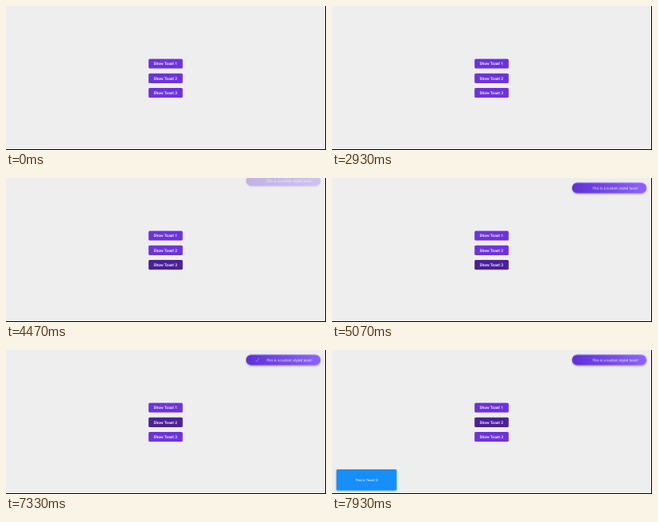
These frames come from a looping animation (400 by 181 pixels, 8 s). An HTML page:

```html
<!DOCTYPE html>
<html lang="en">
<head>
<meta charset="utf-8">
<title>Toast demo</title>
<style>
  html, body { margin: 0; width: 100%; height: 100%; overflow: hidden; background: #eee; }
  svg { display: block; width: 400px; height: 181px; }
  text {
    font-family: Roboto, "Open Sans", sans-serif;
    fill: #fff;
    text-rendering: geometricPrecision;
  }
  .button rect { fill: #6c33dc; }
  .button text { font-size: 4.95px; font-weight: 500; text-anchor: middle; }
  .toast { font-size: 4.4px; }
  .info { font-size: 4.27px; }

  /* One shared 8 s timeline */
  .second rect, .third rect, .toast, .info, .check { animation: 8s linear infinite both; }
  .second rect { animation-name: hover-second; }
  .third rect { animation-name: hover-third; }
  .toast { animation-name: drop-in; }
  .info { animation-name: slide-in; }
  .check {
    fill: none;
    stroke: #62d3f0;
    stroke-width: .75;
    stroke-dasharray: 1 1.2;
    animation-name: draw;
  }

  @keyframes hover-second {
    0%, 87.5% { fill: #6c33dc; }
    91.5%, 100% { fill: #4a2196; }
  }
  @keyframes hover-third {
    0%, 36.6% { fill: #6c33dc; }
    40.9%, 85.8% { fill: #4a2196; }
    90%, 100% { fill: #6c33dc; }
  }
  @keyframes drop-in {
    0%, 54.8% { transform: translateY(-13.4px); opacity: 0; animation-timing-function: ease; }
    60%, 100% { transform: none; opacity: 1; }
  }
  @keyframes slide-in {
    0%, 94.75% { transform: translateX(-76px); opacity: 0; animation-timing-function: ease; }
    99%, 100% { transform: none; opacity: 1; }
  }
  @keyframes draw {
    0%, 63.4% { stroke-dashoffset: 1.1; animation-timing-function: ease-out; }
    79%, 94.99% { stroke-dashoffset: 0; }
    95%, 100% { stroke-dashoffset: 1.1; }
  }
</style>
</head>
<body>
<svg viewBox="0 0 400 181">
  <defs>
    <linearGradient id="violet">
      <stop offset="0" stop-color="#5f2fd8"/>
      <stop offset="1" stop-color="#8d63fc"/>
    </linearGradient>
    <filter id="shadow" x="-10%" y="-40%" width="120%" height="200%">
      <feDropShadow dx="0" dy="1" stdDeviation="1.1" flood-color="#000" flood-opacity=".28"/>
    </filter>
  </defs>

  <rect width="400" height="181" fill="#eee"/>

  <g class="button">
    <rect x="178.2" y="66.4" width="42.6" height="12.2" rx="1.5"/>
    <text x="199.3" y="74.2">Show Toast 1</text>
  </g>
  <g class="button second">
    <rect x="178.2" y="84.7" width="42.6" height="12.2" rx="1.5"/>
    <text x="199.3" y="92.5">Show Toast 2</text>
  </g>
  <g class="button third">
    <rect x="178.2" y="103.1" width="42.6" height="12.2" rx="1.5"/>
    <text x="199.3" y="110.9">Show Toast 3</text>
  </g>

  <g class="toast">
    <rect x="300" y="5.8" width="93.2" height="13.4" rx="6.7" fill="url(#violet)" filter="url(#shadow)"/>
    <path class="check" pathLength="1" d="M311.9 12.6l1.5 1.5 3.2-3.3"/>
    <text x="325.5" y="14">This is a custom styled toast!</text>
  </g>

  <g class="info">
    <rect x="5.5" y="150" width="75.2" height="26.4" rx="1.5" fill="#168ffa" filter="url(#shadow)"/>
    <text x="29" y="164.9">This is Toast 2!</text>
  </g>

  <path d="M399 0h1v181H0v-1h399z"/>
</svg>
</body>
</html>
```
